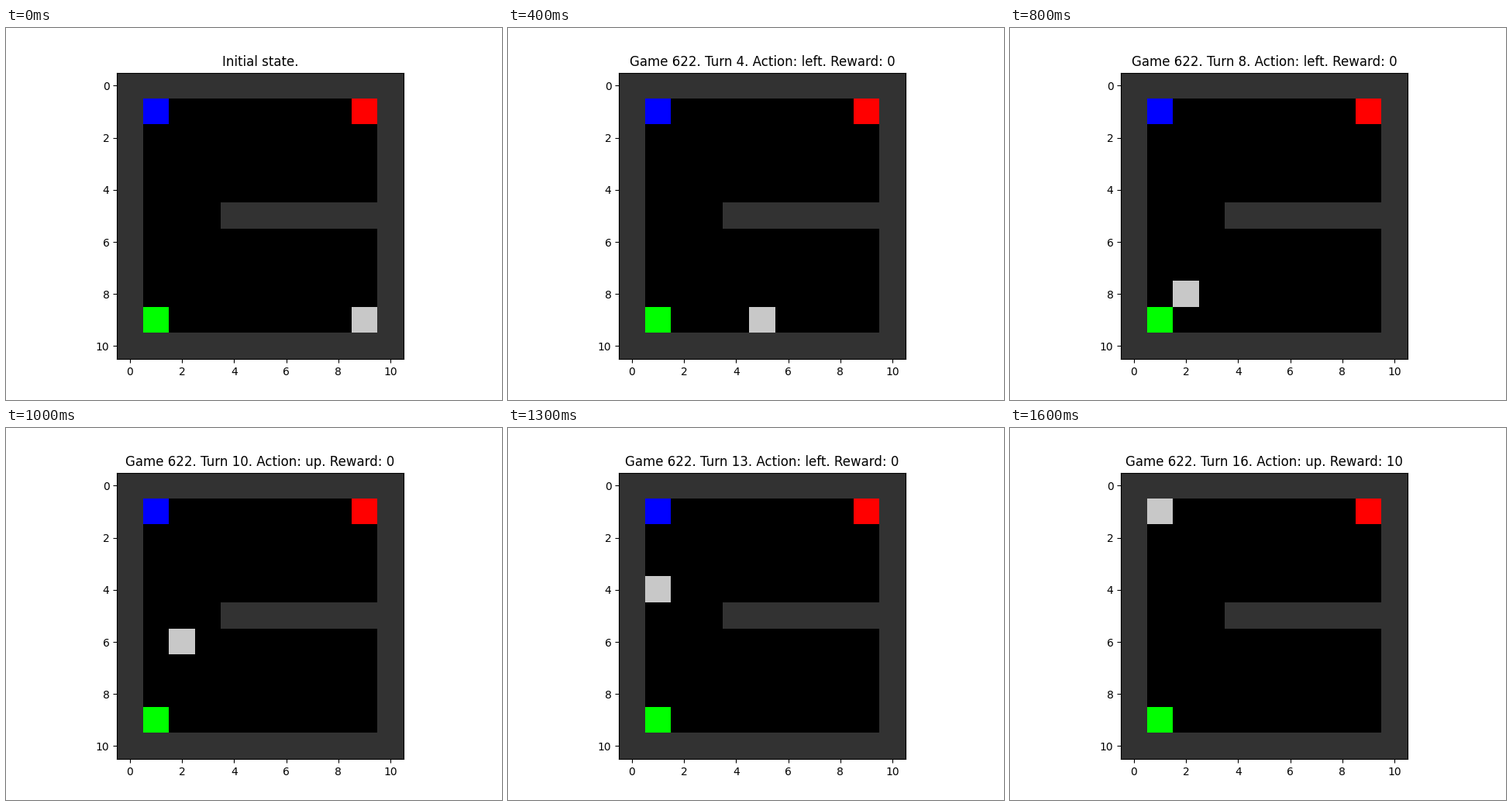
Write a matplotlib script that moves like this. It is 640 px wide and 480 px high and loops after 1700 ms.

```python
import matplotlib.pyplot as plt
import numpy as np
from matplotlib.animation import FuncAnimation

SIZE = 11
START = (9, 9)  # row, column
STEPS = {"left": (0, -1), "up": (-1, 0)}
ACTIONS = (["left"] * 6 + ["up", "left"] + ["up"] * 4
           + ["left"] + ["up"] * 3)

WALL = (50, 50, 50)
AGENT = (200, 200, 200)
BLUE, RED, GREEN = (0, 0, 255), (255, 0, 0), (0, 255, 0)


def make_maze():
    grid = np.full((SIZE, SIZE, 3), WALL, dtype=np.uint8)
    grid[1:-1, 1:-1] = 0
    grid[5, 4:] = WALL
    grid[1, 1] = BLUE
    grid[1, 9] = RED
    grid[9, 1] = GREEN
    return grid


def position(turn):
    moves = [STEPS[action] for action in ACTIONS[:turn]]
    return tuple(np.sum([START] + moves, axis=0))


def caption(turn):
    if turn == 0:
        return "Initial state."
    reward = 10 if turn == len(ACTIONS) else 0
    return f"Game 622. Turn {turn}. Action: {ACTIONS[turn - 1]}. Reward: {reward}"


maze = make_maze()
fig, ax = plt.subplots(figsize=(6.4, 4.8), dpi=100)
image = ax.imshow(maze)
title = ax.set_title("")


def draw(turn):
    grid = maze.copy()
    grid[position(turn)] = AGENT
    image.set_data(grid)
    title.set_text(caption(turn))
    return image, title


anim = FuncAnimation(fig, draw, frames=len(ACTIONS) + 1, interval=100,
                     repeat=True, repeat_delay=0)
plt.show()
```
